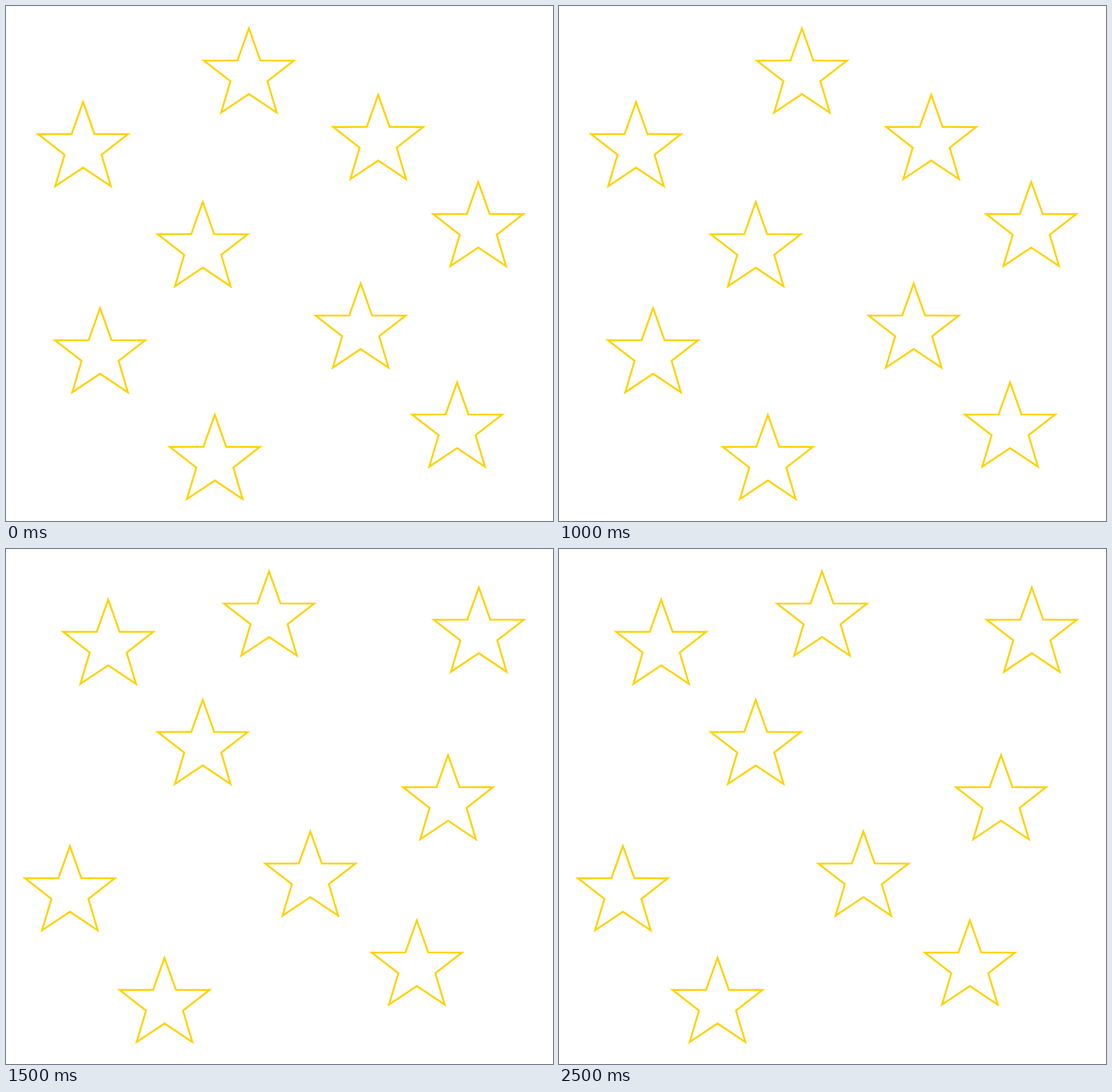
An HTML page for the animation above (3000 ms loop, 771 by 726 pixels).

```html
<!DOCTYPE html>
<html lang="en">
<head>
<meta charset="utf-8">
<title>Jumping stars</title>
<style>
html, body { margin: 0; width: 100%; height: 100%; overflow: hidden; background: #fff; }
svg { display: block; width: 771px; height: 726px; }
path { fill: none; stroke: #ffd200; stroke-width: 2.6; stroke-miterlimit: 10; }
</style>
</head>
<body>
<svg viewBox="0 0 771 726"></svg>
<script>
const NS = 'http://www.w3.org/2000/svg';
const svg = document.querySelector('svg');
const HOLD = 500;
const GRID = 7.09;

// Tips and notches alternate on two rings; the top tip is at 0,0
const tips = { cy: 65.6, rx: 66.7, ry: 65.6 };
const notches = { cy: 66.3, rx: 27.4, ry: 26.2 };
const corners = Array.from({ length: 10 }, (_, i) => {
  const { cy, rx, ry } = i % 2 ? notches : tips;
  const angle = i * Math.PI / 5;
  return [rx * Math.sin(angle), cy - ry * Math.cos(angle)];
});
const outline = 'M' + corners.join('L') + 'Z';

const jumpers = [];

// Adds a star with its top tip at x, y that jumps by whole grid units
function addStar(x, y, right, down) {
  const el = svg.appendChild(document.createElementNS(NS, 'path'));
  el.setAttribute('d', outline);
  jumpers.push(side => el.setAttribute('transform',
    `translate(${x + side * right * GRID} ${y + side * down * GRID})`));
}

addStar(342.4, 31.6, 4, 0);
addStar(108.6, 135.3, 5, -9);
addStar(524.6, 125.3, 20, -10);
addStar(665.6, 248, -6, 6);
addStar(277.3, 276.4, 0, -9);
addStar(132.6, 425.9, -6, -1);
addStar(499.9, 391.1, -10, 1);
addStar(635.8, 530.7, -8, -1);
addStar(294.3, 576.3, -10, 0);

const start = performance.now();
function tick() {
  const side = Math.floor((performance.now() - start) / HOLD) % 2;
  jumpers.forEach(jump => jump(side));
  requestAnimationFrame(tick);
}
tick();
</script>
</body>
</html>
```
